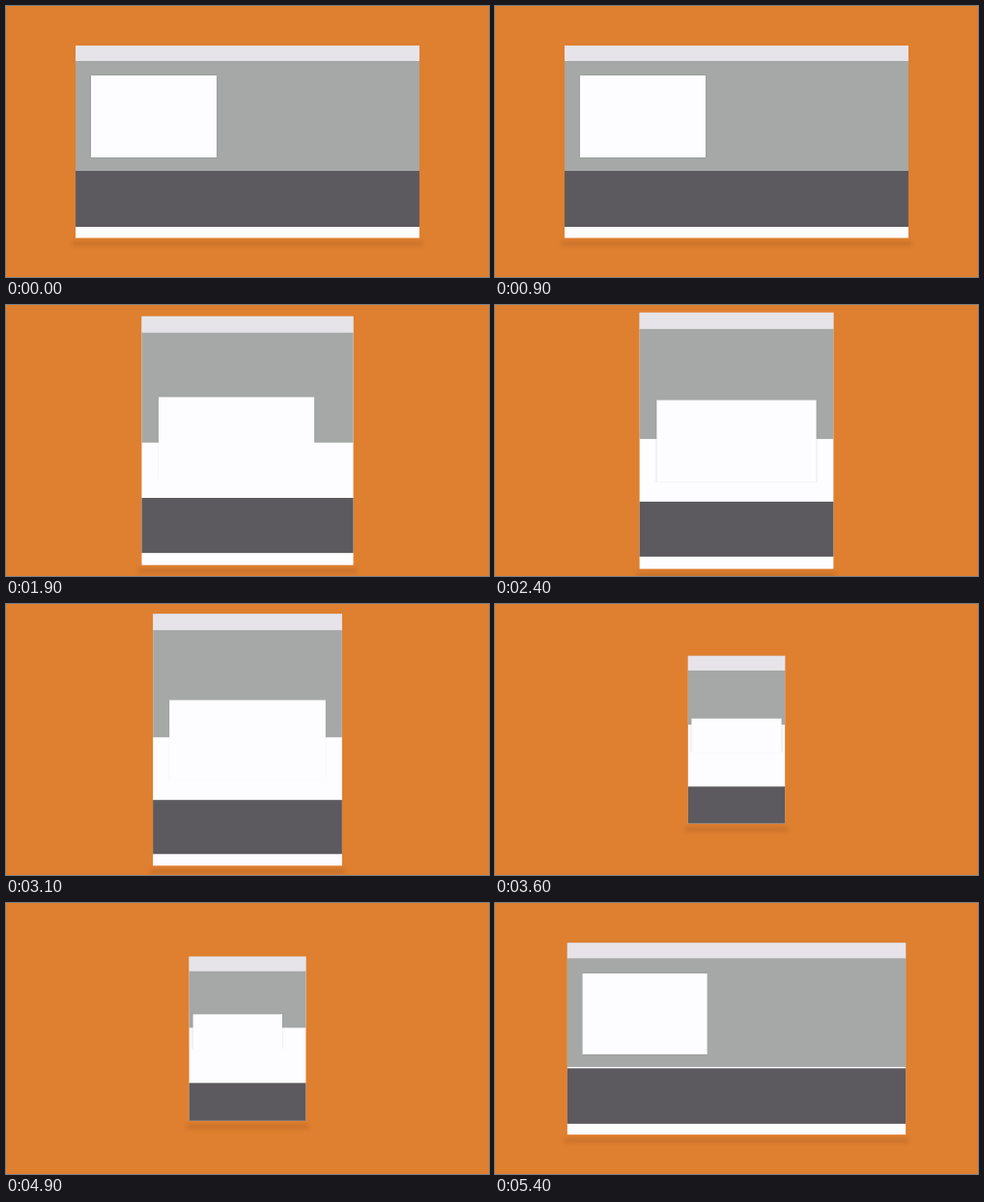
An HTML page with a canvas that plays this animation: 500x281 px, repeating every 5.5 s.

```html
<!DOCTYPE html>
<html lang="en">
<head>
<meta charset="utf-8">
<title>Responsive layout</title>
<style>
html, body { margin: 0; width: 100%; height: 100%; overflow: hidden; background: #df7f30; }
canvas { display: block; width: 500px; height: 281px; }
</style>
</head>
<body>
<canvas id="stage" width="500" height="281"></canvas>
<script>
const ctx = document.getElementById('stage').getContext('2d');
const LOOP = 5500, MOVE = 720, CX = 250, CY = 140.75;

// Section heights run top to bottom; card values are relative to the page corner.
const desktop = { w: 356, head: 16, hero: 114, gap: 0, dark: 58, foot: 11.5, cx: 16, cy: 31, cw: 130, ch: 85 };
const tablet = { w: 200.7, head: 17, hero: 114, gap: 65, dark: 57, foot: 12.7, cx: 17.7, cy: 90.7, cw: 165.3, ch: 85 };
const phone = { w: 93, head: 15, hero: 52, gap: 64, dark: 37, foot: -1.5, cx: 2.5, cy: 63, cw: 88, ch: 31.5 };

const moves = [
  { at: 1342, from: desktop, to: tablet },
  { at: 3002, from: tablet, to: phone },
  { at: 4749, from: phone, to: desktop }
];

const ease = t => (1 - Math.cos(Math.PI * t)) / 2;

function layout(time) {
  const move = moves.filter(m => time >= m.at).pop();
  if (!move) return desktop;
  const p = ease(Math.min(1, (time - move.at) / MOVE));
  const out = {};
  for (const key in desktop) out[key] = move.from[key] + (move.to[key] - move.from[key]) * p;
  return out;
}

function box(color, x, y, w, h) {
  ctx.fillStyle = color;
  ctx.fillRect(x, y, w, h);
}

function draw(time) {
  const s = layout(time);
  const foot = Math.max(0, s.foot);
  const h = s.head + s.hero + s.gap + s.dark + foot;
  const x = CX - s.w / 2, y = CY - h / 2;
  const darkY = y + s.head + s.hero + s.gap;

  box('#df7f30', 0, 0, 500, 281);
  ctx.filter = 'blur(2px)';
  box('rgba(90, 50, 20, 0.2)', x - 3, y + h + 4, s.w + 6, 4);
  ctx.filter = 'none';

  box('#fdfcfe', x, y, s.w, h);
  box('#a5a8a6', x, y, s.w, s.head + s.hero);
  box('#e6e4e8', x, y, s.w, s.head);
  box('#5c5a5e', x, darkY, s.w, s.dark);

  ctx.shadowColor = 'rgba(0, 0, 0, 0.18)';
  ctx.shadowBlur = 1.5;
  box('#fdfcfe', x + s.cx, y + s.cy, s.cw, s.ch);
  ctx.shadowColor = 'transparent';
}

const start = performance.now();
function tick() {
  draw((performance.now() - start) % LOOP);
  requestAnimationFrame(tick);
}
tick();
</script>
</body>
</html>
```
